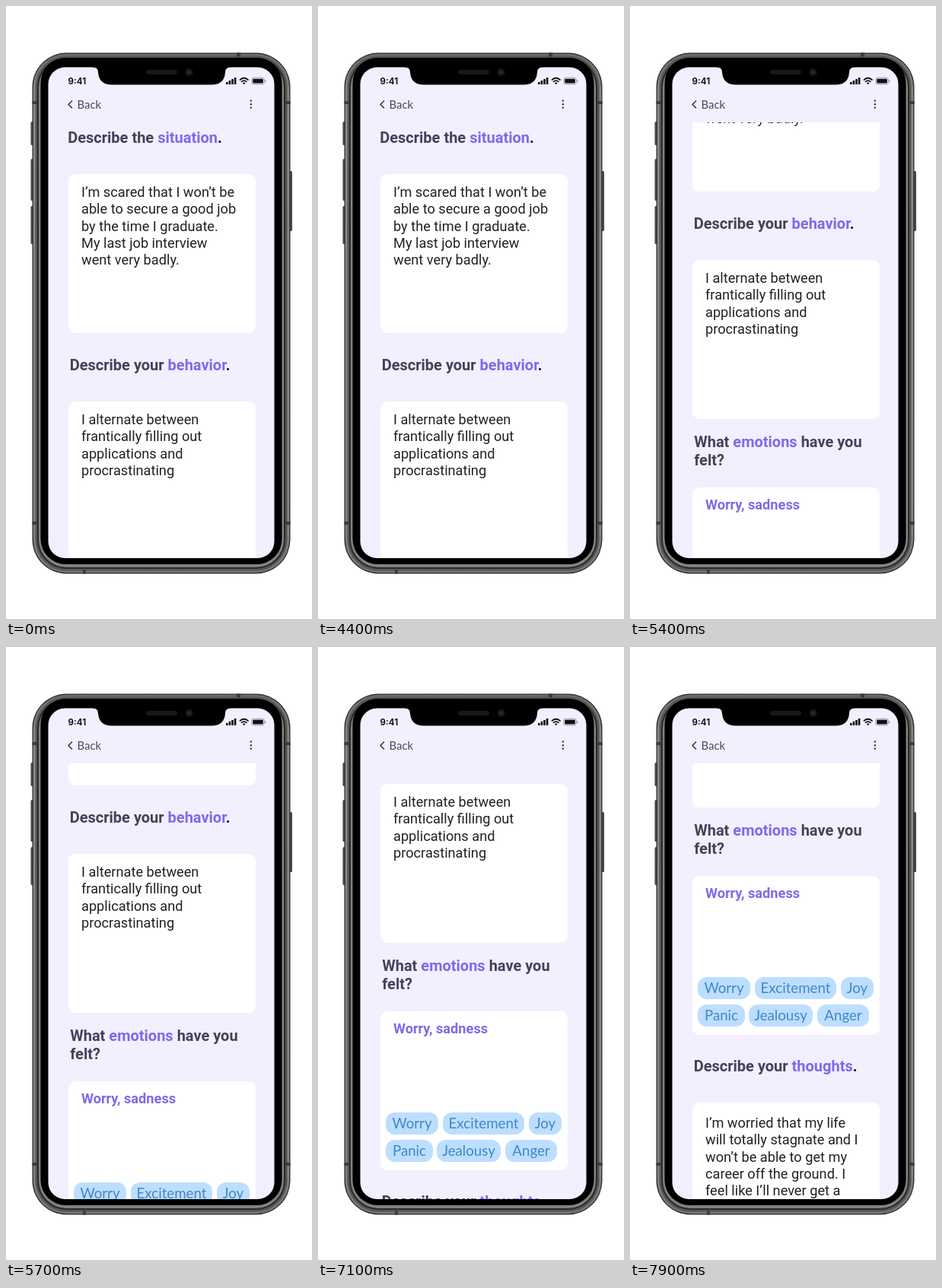
An HTML page that plays this animation: 402 by 806 pixels, repeating every 8 s.

```html
<!DOCTYPE html>
<html lang="en">
<head>
<meta charset="utf-8">
<title>Journal scroll</title>
<style>
  html, body { margin: 0; width: 100%; height: 100%; overflow: hidden; background: #fff; }
  svg { display: block; width: 100%; height: 100%; }
  text { white-space: pre; }
  .head { font: 700 20px Roboto, sans-serif; fill: #454158; }
  .body { font: 400 18.2px Roboto, sans-serif; fill: #212125; }
  .mood { font: 700 18.2px Roboto, sans-serif; fill: #8268e8; }
  .chip { font: 400 18.7px Lato, sans-serif; fill: #3f88c6; text-anchor: middle; }
  .back { font: 400 14.9px Lato, sans-serif; fill: #4b4956; }
  .time { font: 700 11.5px Inter, sans-serif; fill: #16161c; }
  .key { fill: #8268e8; }
  .dot { fill: #18181f; }
</style>
</head>
<body>
<svg viewBox="0 0 402 806" xmlns="http://www.w3.org/2000/svg">
  <defs>
    <clipPath id="view"><rect x="55" y="153" width="298" height="573"/></clipPath>
    <linearGradient id="metal" x1="0" y1="0" x2="0" y2="1">
      <stop offset="0" stop-color="#6c6c6c"/>
      <stop offset=".1" stop-color="#8b8b8b"/>
      <stop offset=".9" stop-color="#858585"/>
      <stop offset="1" stop-color="#737373"/>
    </linearGradient>
  </defs>
  <rect width="402" height="806" fill="#fff"/>
  <g id="phone"></g>
  <rect x="55.5" y="80.5" width="297" height="645.500" rx="22" fill="#f2efff"/>
  <g clip-path="url(#view)"><g id="page"></g></g>
  <g id="bar"></g>
</svg>
<script>
const $ = id => document.getElementById(id);
const NS = "http://www.w3.org/2000/svg";

function add(parent, tag, attrs, text) {
  const el = document.createElementNS(NS, tag);
  for (const k in attrs) el.setAttribute(k, attrs[k]);
  if (text) el.textContent = text;
  parent.appendChild(el);
  return el;
}
const box = (p, x, y, width, height, rx, fill) => add(p, "rect", { x, y, width, height, rx, fill });
const write = (p, cls, x, y, text) => add(p, "text", { class: cls, x, y }, text);

// Device body: nested metal rings around a black bezel
const phone = $("phone");
[[32.5, 152, 31], [32.5, 201, 55], [32.5, 263, 50], [372, 217, 79]]
  .forEach(([x, y, h]) => box(phone, x, y, 4, h, 1.5, "#4a4a4a"));
[[0, "#2d2d2d"], [1.3, "url(#metal)"], [4, "#555"], [6.5, "#2a2a2a"], [8.5, "#828282"]]
  .forEach(([d, fill]) => box(phone, 34.5 + d, 61.5 + d, 339 - 2 * d, 685 - 2 * d, 45 - d, fill));
box(phone, 45.5, 68, 317, 666, 33, "#000");
for (const y of [125, 678]) {
  box(phone, 34.5, y, 6, 4, 0, "#3b3b3b");
  box(phone, 367.5, y, 6, 4, 0, "#3b3b3b");
}
box(phone, 303, 61.5, 5, 5, 0, "#3b3b3b");
box(phone, 101, 741.5, 4, 5, 0, "#3b3b3b");

// Scrolling page
const page = $("page");
const card = y => box(page, 82, y, 246, 209, 9, "#fff");
const lines = (y, list) => list.forEach((s, i) => write(page, "body", 99, y + i * 22.35, s));

function heading(x, y, before, key, after) {
  const t = write(page, "head", x, y);
  add(t, "tspan", {}, before);
  add(t, "tspan", { class: "key" }, key);
  add(t, "tspan", after === "." ? { class: "dot" } : {}, after);
}
function chips(y, list) {
  for (const [x, w, label] of list) {
    box(page, x, y, w, 29, 12, "#bddefe");
    write(page, "chip", x + w / 2, y + 21, label);
  }
}

heading(81.2, 180, "Describe the ", "situation", ".");
card(221);
lines(251, ["I’m scared that I won’t be", "able to secure a good job",
  "by the time I graduate.", "My last job interview", "went very badly."]);

heading(83.7, 478.5, "Describe your ", "behavior", ".");
card(520);
lines(550, ["I alternate between", "frantically filling out", "applications and", "procrastinating"]);

heading(84.2, 765.5, "What ", "emotions", " have you");
write(page, "head", 84.2, 789.5, "felt?");
card(819);
write(page, "mood", 99, 848, "Worry, sadness");
chips(952, [[89, 69, "Worry"], [164, 107, "Excitement"], [277, 43, "Joy"]]);
chips(988, [[89, 62, "Panic"], [156, 84, "Jealousy"], [246, 68, "Anger"]]);

heading(83.7, 1076, "Describe your ", "thoughts", ".");
card(1117);
lines(1150, ["I’m worried that my life", "will totally stagnate and I",
  "won’t be able to get my", "career off the ground. I", "feel like I’ll never get a"]);

// Notch, status bar and navigation
const bar = $("bar");
const path = (d, stroke, width) => add(bar, "path", {
  d, fill: "none", stroke, "stroke-width": width, "stroke-linecap": "round", "stroke-linejoin": "round"
});
add(bar, "path", {
  d: "M114 79V80.500Q121 80.500 121 87Q122 103.500 139 103.500H270Q287 103.500 288 87Q288 80.500 295 80.500V79Z", fill: "#000"
});
box(bar, 184, 84, 41, 6, 3, "#191919");
add(bar, "circle", { cx: 240.5, cy: 87, r: 5, fill: "#17181c" });
add(bar, "circle", { cx: 240.5, cy: 87, r: 2, fill: "#2b2e39" });

write(bar, "time", 81.5, 103, "9:41");
for (let i = 0; i < 4; i++) box(bar, 289 + i * 3.6, 100 - i * 2, 2.6, 3 + i * 2, .6, "#111");
path("M307.500 97Q312.700 92.500 318 97", "#111", 1.7);
path("M309.600 99.400Q312.700 96.800 315.900 99.400", "#111", 1.7);
add(bar, "path", { d: "M310.900 101.200Q312.700 99.800 314.500 101.200L312.700 103.200Z", fill: "#111" });
add(bar, "rect", { x: 322.8, y: 94.4, width: 16.4, height: 8.4, rx: 2.4, fill: "none", stroke: "#8a8892", "stroke-width": .8 });
box(bar, 324.2, 95.8, 13.6, 5.6, 1.2, "#111");
box(bar, 340, 97.2, 1.2, 2.8, .6, "#8a8892");

path("M86.500 125L82 129.500L86.500 134", "#3f3d4c", 1.7);
write(bar, "back", 93.5, 134.6, "Back");
for (const cy of [124.6, 129.2, 133.8]) add(bar, "circle", { cx: 321.8, cy, r: 1.25, fill: "#3f3d4c" });

// Two swipes, shown at ten pictures a second
const LOOP = 8000, STEP = 100;
function swipe(t, from, to, distance) {
  const p = Math.min(1, Math.max(0, (t - from) / (to - from)));
  return distance * p * p * (3 - 2 * p);
}
function draw(ms) {
  const t = Math.floor((ms % LOOP) / STEP) * STEP;
  const y = Math.round(swipe(t, 4400, 6030, 278) + swipe(t, 6700, 7900, 240));
  page.setAttribute("transform", `translate(0 ${-y})`);
}
const start = performance.now();
function tick() {
  draw(performance.now() - start);
  requestAnimationFrame(tick);
}
tick();
</script>
</body>
</html>
```
